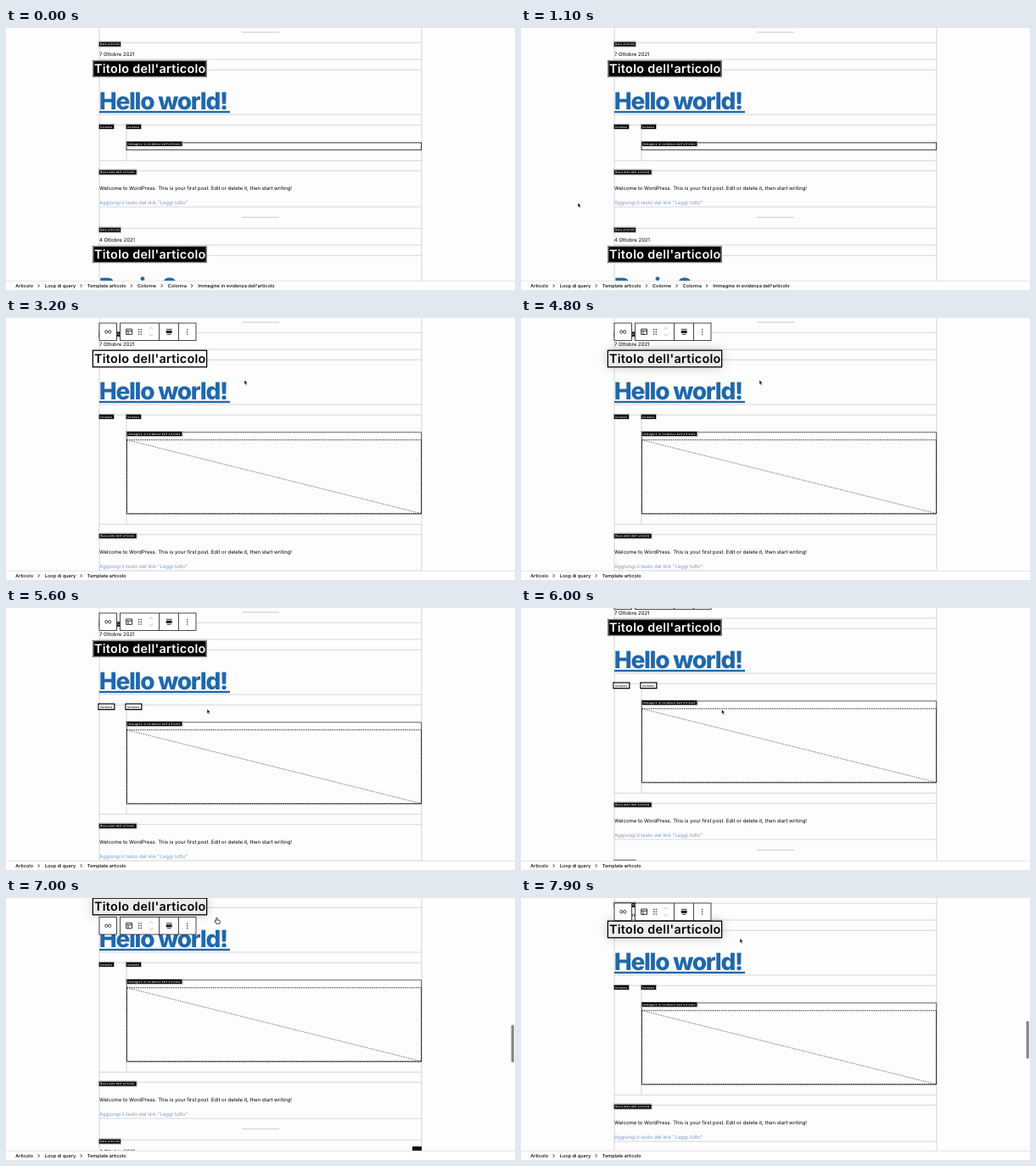
Recreate the animation shown at these times as an HTML page. Size 600 by 309 pixels, loop 8 s.

```html
<!DOCTYPE html>
<html lang="it">
<head>
<meta charset="utf-8">
<title>Editor a blocchi</title>
<style>
  html, body { margin: 0; width: 100%; height: 100%; overflow: hidden; background: #fdfdfd; }
  svg { display: block; width: 600px; height: 309px; }
  text { font-family: Inter, "Liberation Sans", sans-serif; font-size: 5.98px; fill: #000; white-space: pre; text-rendering: geometricPrecision; }
  .line { fill: none; stroke: #bcbcbc; stroke-width: .6; }
  .head { font-size: 28px; font-weight: 800; letter-spacing: -.045em; fill: #1f68ac; }
  .link { fill: #7c9dc9; }
  .crumb { font-size: 5.55px; font-weight: 500; }
  .tag text { font-size: 3px; font-weight: 700; letter-spacing: .35px; fill: #fff; }
  .tag .ring { fill: #fff; stroke: #888; stroke-width: .4; }
  .tag.big text { font-size: 14.4px; font-weight: 600; letter-spacing: .3px; }
  .tag.big .ring { stroke: #222; stroke-width: .6; }
  .tag.lit .ring { stroke: #000; stroke-width: 1.3; }
  .tag.lit .fill { fill: var(--bg, #fff); }
  .tag.lit text { fill: #000; }
  .tag.glow { filter: drop-shadow(0 0 6px #0003); }
  .box { fill: #fff; stroke: #2a2a2a; stroke-width: .85; }
  .icon { fill: none; stroke: #1e1e1e; stroke-width: .9; }
  .pale { stroke: #bbb; }
</style>
</head>
<body>
<svg id="stage" viewBox="0 0 600 309"></svg>
<script>
const LOOP = 8000, STEP = 100, GROWTH = 87, POST_GAP = 219;

const rect = (x, y, w, h, attr = '') => `<rect x="${x}" y="${y}" width="${w}" height="${h}" ${attr}/>`;
const path = (d, attr = 'class="line"') => `<path d="${d}" ${attr}/>`;
const text = (x, y, s, attr = '') => `<text x="${x}" y="${y}" ${attr}>${s}</text>`;
const group = (attr, ...parts) => `<g ${attr}>${parts.join('')}</g>`;
const rule = y => path(`M110 ${y}H490`);
const divider = y => path(`M278 ${y}H322`, 'stroke="#bbb" stroke-width=".8"');

const tag = (x, y, w, label, id = '') => group(`class="tag" id="${id}"`,
  rect(x, y, w, 6.6, 'class="ring"'),
  rect(x + .7, y + .7, w - 1.4, 5.2, 'class="fill"'),
  text(x + 2, y + 4.4, label));

const titleTag = id => group(`class="tag big" id="${id}"`,
  rect(102.4, 38.2, 134.2, 19.6, 'class="ring"'),
  rect(103.3, 39.1, 132.4, 17.8, 'class="fill"'),
  text(104, 53, "Titolo dell'articolo"));

const postHead = (date, title, id) => [
  rule(17.3), rule(37), rule(49.3), rule(102),
  tag(109, 15.8, 26.8, 'Data articolo'),
  text(110, 32.8, date),
  text(109.7, 96, title, 'class="head"'),
  titleTag(id)
].join('');

const underline = rect(110, 97.8, 154, 2.4, 'fill="#1f68ac"');

const columns = [
  rule(114.3),
  path('M142 114V156', 'class="line" id="side"'),
  rect(142, 135.2, 347.6, 8.6, 'id="flat" fill="none" stroke="#222" stroke-width=".9"'),
  group('id="photo"',
    path('M142.3 231V134.8H489.7V231Z', 'fill="none" stroke="#222" stroke-width=".7"'),
    rect(142.5, 143.8, 347, 86.8, 'fill="none" stroke="#000" stroke-width=".8" stroke-dasharray="1.6 1"'),
    path('M142.5 143.8L489.5 230.6', 'stroke="#333" stroke-width=".65" stroke-dasharray="1.6 1.2"')),
  tag(109, 113.1, 18.8, 'Colonne', 'colA'),
  tag(141, 113.1, 18.8, 'Colonna', 'colB'),
  tag(141.6, 133.3, 66.6, "Immagine in evidenza dell'articolo")
].join('');

const rest = group('id="rest"',
  rule(156.3), rule(168.3), rule(211),
  tag(109, 166.8, 45.4, "Riassunto dell'articolo"),
  text(110, 190.5, 'Welcome to WordPress. This is your first post. Edit or delete it, then start writing!'),
  text(110, 207.7, 'Aggiungi il testo del link "Leggi tutto"', 'class="link"'),
  divider(223.3),
  group(`transform="translate(0 ${POST_GAP})"`, postHead('4 Ottobre 2021', 'Basic 2', 'title2')),
  rect(479, 244, 11, 11, 'fill="#111" id="adder"'));

// Toolbar drawn with its top edge at zero
const dots = (xs, ys) => xs.flatMap(x => ys.map(y => `<circle cx="${x}" cy="${y}" r=".75" fill="#1e1e1e"/>`)).join('');
const toolbar = group('id="toolbar"',
  rect(110, 0, 20.5, 20.5, 'class="box"'),
  rect(134.5, 0, 89.5, 20.5, 'class="box"'),
  path('M180.5 0V20.5M203.5 0V20.5', 'class="box"'),
  path('M120.2 10.2C119 7.4 116.5 8.2 116.8 10.4C117 12.8 119.3 12.4 120.2 10.2C121 7.8 123.6 8 123.8 10.2C123.6 12.8 121.4 12.8 120.2 10.2', 'class="icon"'),
  path('M141.7 7H148.5V13.4H141.7ZM141.7 9.2H148.5M144 9.2V13.4', 'class="icon"'),
  dots([156.7, 159.3], [7.4, 10.2, 13]),
  path('M168.5 7.6L171 5.2L173.5 7.6M168.5 12.8L171 15.2L173.5 12.8', 'class="icon pale"'),
  path('M188.7 7.3H195.7M190 13.3H194.5', 'class="icon"'),
  rect(188.7, 8.8, 7, 3.1, 'fill="#1e1e1e"'),
  dots([213.7], [7.4, 10.2, 13]));

const crumbs = [[11.3, 'Articolo'], [45.8, 'Loop di query'], [95.8, 'Template articolo'],
  [155, 'Colonne'], [190.8, 'Colonna'], [226.2, "Immagine in evidenza dell'articolo"]];
const crumb = ([x, label], i) =>
  (i ? path(`M${x - 8} 302.2l1.7 1.8l-1.7 1.8`, 'class="icon"') : '') + text(x, 306, label, 'class="crumb"');
const footer = [
  rect(0, 298, 600, 11, 'fill="#fff"'),
  path('M0 298.4H600', 'stroke="#ddd" stroke-width=".8"'),
  ...crumbs.slice(0, 3).map(crumb),
  group('id="deep"', ...crumbs.slice(3).map((c, i) => crumb(c, i + 3)))
].join('');

const pointer = group('id="pointer"',
  path('M0 0V5.6L1.3 4.4L2.2 6.4L3.2 5.9L2.3 4H4Z', 'id="arrow" fill="#000" stroke="#fff" stroke-width=".6"'),
  path('M-.8 0Q0-.8.7 0V2.2L3.4 2.8Q4.2 3.2 3.8 5L3.2 6.6H-.6L-2.6 3.6Q-2.2 2.6-.8 3.8Z', 'id="hand" fill="#fff" stroke="#111" stroke-width=".8"'));

const stage = document.getElementById('stage');
stage.innerHTML = [
  rect(0, 0, 600, 309, 'fill="#fdfdfd"'),
  path('M110 0V298M490 0V298'),
  group('id="page"', divider(5), postHead('7 Ottobre 2021', 'Hello world!', 'title1'), underline, columns, rest),
  toolbar,
  rect(595.6, 0, 3.2, 44.5, 'rx="1.6" fill="#858585" id="thumb"'),
  footer, pointer
].join('');

const el = {};
stage.querySelectorAll('[id]').forEach(n => { if (n.id) el[n.id] = n; });

const scrollKeys = [[5600, 0], [6000, -25], [6500, -40], [6800, -40], [7000, -38], [7700, -11]];
const pointerKeys = [[600, 66, 300], [1100, 67, 206], [1200, 67, 206], [2100, 212, 47], [2600, 212, 47],
  [3200, 281, 73], [4800, 281, 73], [5600, 237, 119], [6000, 236.5, 119.5], [6700, 248.5, 23.7],
  [7000, 248.5, 23.7], [7900, 258, 47.5]];

function sample(keys, t) {
  const n = keys.findIndex(k => k[0] > t);
  if (n === 0) return keys[0].slice(1);
  if (n < 0) return keys[keys.length - 1].slice(1);
  const a = keys[n - 1], b = keys[n], p = (t - a[0]) / (b[0] - a[0]);
  const e = p * p * (3 - 2 * p);
  return a.slice(1).map((v, i) => v + (b[i + 1] - v) * e);
}

const within = (t, a, b) => t >= a && t < b;
const show = (node, on) => node.setAttribute('display', on ? 'inline' : 'none');
const move = (node, x, y) => node.setAttribute('transform', `translate(${x} ${y})`);

function draw(t) {
  const [scroll] = sample(scrollKeys, t);
  const grown = t >= 2700, picked = t >= 2400;
  move(el.page, 0, scroll);
  move(el.rest, 0, grown ? GROWTH : 0);
  el.side.setAttribute('d', `M142 114V${grown ? 243 : 156}`);
  show(el.flat, !grown);
  show(el.photo, grown);
  show(el.adder, grown);
  show(el.deep, !picked);

  show(el.toolbar, picked);
  move(el.toolbar, 0, t < 6600 ? 6 + scroll : t < 7300 ? 22.5 : 6);

  const lit = within(t, 2700, 5000) || t >= 6400;
  el.title1.classList.toggle('lit', lit);
  el.title1.classList.toggle('glow', lit && t >= 4800);
  el.title1.style.setProperty('--bg', t >= 4800 ? '#ececec' : '#fff');
  const overColumn = within(t, 5500, 6300);
  el.colA.classList.toggle('lit', overColumn);
  el.colB.classList.toggle('lit', overColumn);

  show(el.thumb, t >= 6200);
  el.thumb.setAttribute('y', 143.2 - scroll * .165);

  const [x, y] = sample(pointerKeys, t);
  const hand = within(t, 2000, 2700) || within(t, 6600, 7300);
  show(el.pointer, t >= 600);
  show(el.hand, hand);
  show(el.arrow, !hand);
  move(el.pointer, x, y);
}

const start = performance.now();
function tick(now) {
  const t = Math.max(0, now - start) % LOOP;
  draw(Math.floor(t / STEP) * STEP);
  requestAnimationFrame(tick);
}
draw(0);
requestAnimationFrame(tick);
</script>
</body>
</html>
```
